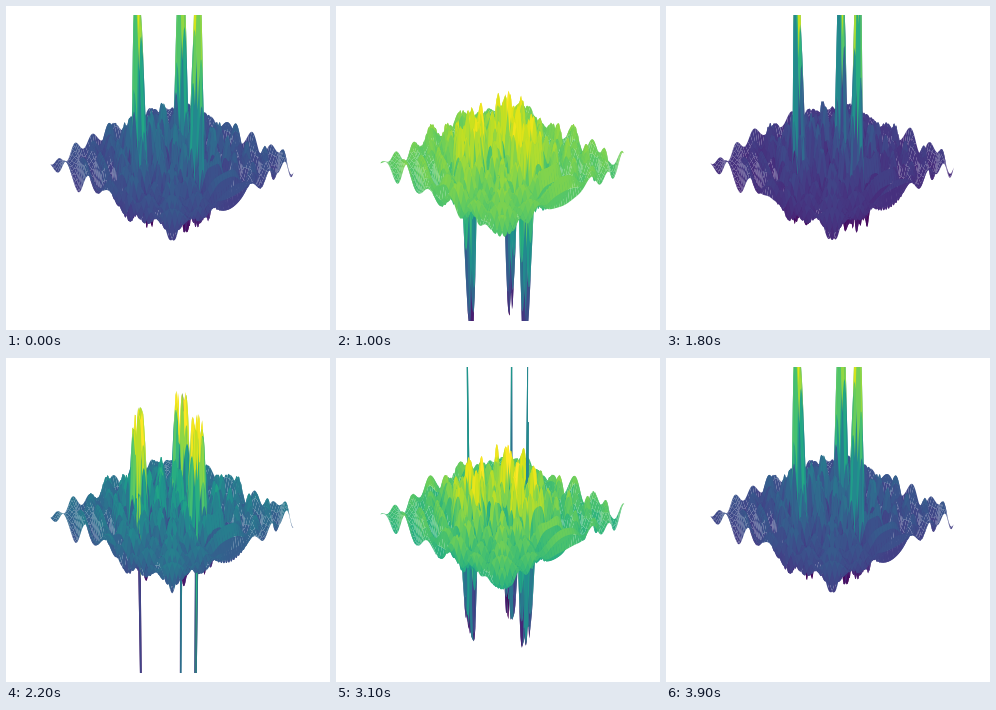
Write a matplotlib script that moves like this. It is 324 px wide and 324 px high and loops after 4 s.

```python
import numpy as np
import matplotlib.pyplot as plt
from matplotlib.animation import FuncAnimation

SIZE, DPI = 324, 72
FRAMES, INTERVAL = 40, 100
PERIODS = 2            # wave periods per loop
HALF, POINTS = 5, 150  # half width of the grid, samples per side
RADIUS = 2             # distance of the emitters from the centre
PAD = 8.64 / SIZE

axis = np.linspace(-HALF, HALF, POINTS)
X, Y = np.meshgrid(axis, axis)
angles = np.radians([90, 210, 330])
distances = [np.hypot(X - RADIUS * np.cos(a), Y - RADIUS * np.sin(a))
             for a in angles]


def height(t):
    """Sum of circular waves of unit wavelength and period."""
    return sum(np.sin(2 * np.pi * (r - t)) / r for r in distances)


fig = plt.figure(figsize=(SIZE / DPI, SIZE / DPI), dpi=DPI, facecolor="white")
ax = fig.add_axes([PAD, PAD, 1 - 2 * PAD, 1 - 2 * PAD], projection="3d")
ax.view_init(elev=30, azim=45)
ax.set_zlim(-2, 2)
ax.set_axis_off()

surfaces = []


def draw(i):
    while surfaces:
        surfaces.pop().remove()
    t = PERIODS * (i % (FRAMES - 1)) / (FRAMES - 1)
    surface = ax.plot_surface(X, Y, height(t), cmap="viridis", linewidth=0,
                              rcount=50, ccount=50)
    surfaces.append(surface)
    return surfaces


anim = FuncAnimation(fig, draw, frames=FRAMES, interval=INTERVAL,
                     init_func=lambda: draw(0), repeat=True, repeat_delay=0,
                     blit=False)
plt.show()
```
